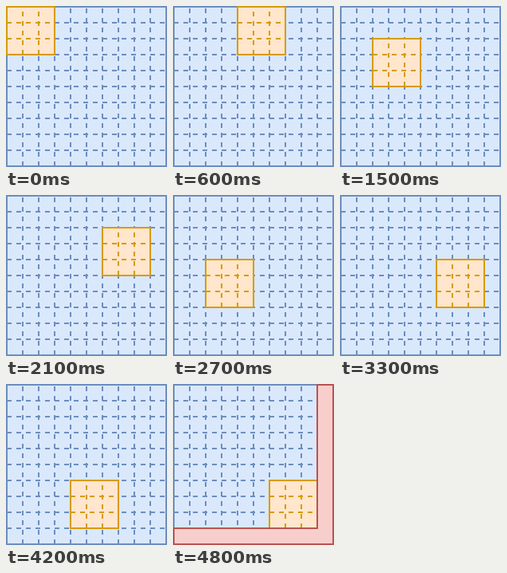
An HTML page with a canvas for the animation above (5.5 s loop, 202 by 202 pixels).

```html
<!DOCTYPE html>
<html lang="en">
<head>
<meta charset="utf-8">
<title>Strided kernel over a grid</title>
<style>
  html, body { margin: 0; width: 100%; height: 100%; overflow: hidden; }
  canvas { display: block; width: 202px; height: 202px; }
</style>
</head>
<body>
<canvas id="stage" width="202" height="202"></canvas>
<script>
const ctx = document.getElementById("stage").getContext("2d");
const CELL = 20, STRIDE = 2, STEPS = 4, STEP_MS = 300, LOOP_MS = 5500;
const BLUE = { fill: "#dae8fc", line: "#6c8ebf" };
const ORANGE = { fill: "#ffe6cc", line: "#d79b00" };
const RED = { fill: "#f8cecc", line: "#b85450" };

function drawGrid(x, y, cells, color) {
  const size = cells * CELL;
  ctx.fillStyle = color.fill;
  ctx.strokeStyle = color.line;
  ctx.fillRect(x, y, size, size);
  ctx.strokeRect(x, y, size, size);
  ctx.setLineDash([6, 6]);
  ctx.beginPath();
  for (let d = CELL; d < size; d += CELL) {
    ctx.moveTo(x, y + d);
    ctx.lineTo(x + size, y + d);
    // columns run upwards, so their dashes start at the bottom
    ctx.moveTo(x + d, y + size);
    ctx.lineTo(x + d, y);
  }
  ctx.stroke();
  ctx.setLineDash([]);
}

function drawUnused() {
  const inner = 1 + 9 * CELL, outer = 1 + 10 * CELL;
  ctx.fillStyle = RED.fill;
  ctx.strokeStyle = RED.line;
  ctx.beginPath();
  ctx.moveTo(inner, 1);
  ctx.lineTo(outer, 1);
  ctx.lineTo(outer, outer);
  ctx.lineTo(1, outer);
  ctx.lineTo(1, inner);
  ctx.lineTo(inner, inner);
  ctx.closePath();
  ctx.fill();
  ctx.stroke();
}

function draw(ms) {
  const count = STEPS * STEPS;
  const tick = Math.floor(ms / STEP_MS);
  const step = Math.min(tick, count - 1);
  const jump = STRIDE * CELL;
  ctx.clearRect(0, 0, 202, 202);
  ctx.lineWidth = 2;
  drawGrid(1, 1, 10, BLUE);
  drawGrid(1 + (step % STEPS) * jump, 1 + Math.floor(step / STEPS) * jump, 3, ORANGE);
  if (tick >= count) drawUnused();
}

const start = performance.now();
function frame() {
  draw((performance.now() - start) % LOOP_MS);
  requestAnimationFrame(frame);
}
draw(0);
requestAnimationFrame(frame);
</script>
</body>
</html>
```
